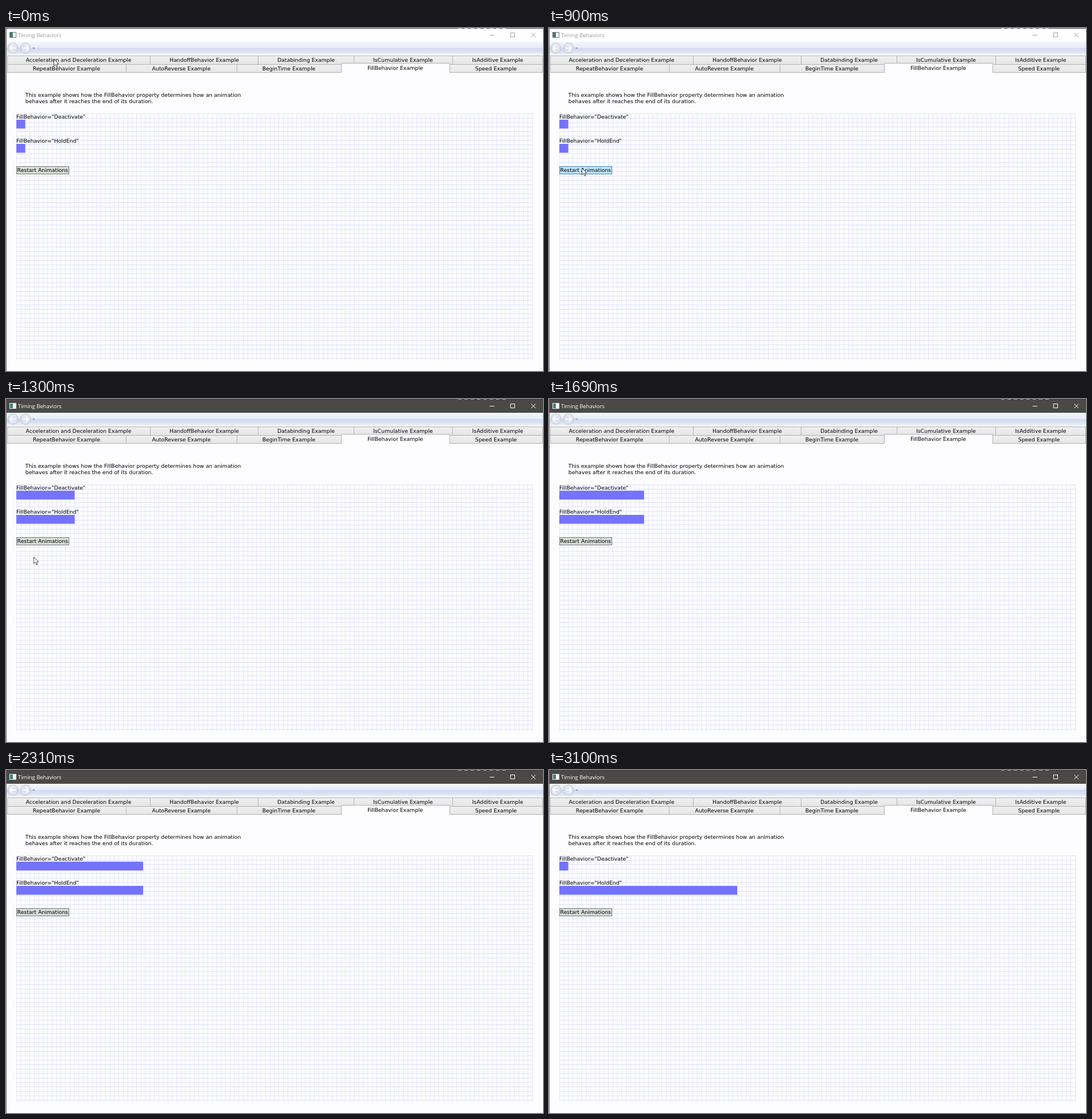
Recreate the animation shown at these times as an HTML page with a canvas. Size 936 px wide and 598 px high, loop 4.68 s.

```html
<!DOCTYPE html>
<html lang="en">
<head>
<meta charset="utf-8">
<title>Timing Behaviors</title>
<style>
  html, body { margin: 0; width: 100%; height: 100%; overflow: hidden; background: #fdfdff; }
  canvas { display: block; }
</style>
</head>
<body>
<canvas id="stage" width="936" height="598"></canvas>
<script>
const ctx = document.getElementById('stage').getContext('2d');
const W = 936, H = 598, LOOP = 4680;
const UNIT = 0.775;          // screen pixels per layout unit
const LEFT = 18;
const UI_FONT = '9.3px "DejaVu Sans", Verdana, sans-serif';
const TITLE_FONT = '9.45px "Open Sans", "Noto Sans", sans-serif';

// Pointer stops: [time, x, y]; no position means hidden
const POINTER = [
  [0, 83, 54], [110, 135, 218], [310, 107, 226], [500, 79, 235],
  [700, 57, 244], [1300, 48, 275], [1470]
];
const TICKS = [1100, 1300, 1470, 1690, 1910, 2110, 2310, 2510, 2700, 2900];
const ACTIVE_AT = 1100, END_AT = 3100;

const ROW_1 = [
  [2, 251, 126.5, 'Acceleration and Deceleration Example'],
  [251, 439, 345.5, 'HandoffBehavior Example'],
  [439, 606, 523, 'Databinding Example'],
  [606, 778, 692, 'IsCumulative Example'],
  [778, 935, 857, 'IsAdditive Example']
];
const ROW_2 = [
  [2, 209, 105.5, 'RepeatBehavior Example'],
  [209, 402, 305.5, 'AutoReverse Example'],
  [402, 584, 493, 'BeginTime Example'],
  [773, 935, 854, 'Speed Example']
];

function rect(x, y, w, h, color) {
  ctx.fillStyle = color;
  ctx.fillRect(x, y, w, h);
}

function frame(x, y, w, h, color) {
  ctx.strokeStyle = color;
  ctx.lineWidth = 1;
  ctx.strokeRect(x + 0.5, y + 0.5, w - 1, h - 1);
}

function line(points, color, width = 1) {
  ctx.strokeStyle = color;
  ctx.lineWidth = width;
  ctx.beginPath();
  points.forEach(([x, y]) => ctx.lineTo(x, y));
  ctx.stroke();
}

function text(str, x, y, align = 'left', color = '#000', font = UI_FONT) {
  ctx.font = font;
  ctx.textAlign = align;
  ctx.fillStyle = color;
  ctx.fillText(str, x, y);
}

function gradient(y0, y1, stops) {
  const g = ctx.createLinearGradient(0, y0, 0, y1);
  stops.forEach(([at, color]) => g.addColorStop(at, color));
  return g;
}

function titleBar(active) {
  const ink = active ? '#fff' : '#a3a3a3';
  rect(0, 0, W, 24, active ? '#4b4946' : '#fff');
  rect(0, 0, W, 1, '#3a3a3a');
  for (let x = 788; x < 866; x += 11) rect(x, 0, 6, 1, '#a8a8a8');

  rect(6, 7, 12, 10, active ? '#e8eeee' : '#6f7777');
  rect(7, 8, 10, 8, '#fff');
  rect(7, 8, 5, 8, '#3d7f78');
  text('Timing Behaviors', 21, 15.6, 'left', active ? '#fff' : '#999', TITLE_FONT);

  line([[843, 12.5], [851, 12.5]], ink);
  frame(879, 8, 8, 8, ink);
  line([[915.5, 8.5], [923, 16]], ink);
  line([[923, 8.5], [915.5, 16]], ink);
}

function navButton(x, dir) {
  const y = 35;
  ctx.beginPath();
  ctx.arc(x, y, 9, 0, Math.PI * 2);
  ctx.fillStyle = gradient(26, 44, [[0, '#eceff6'], [0.5, '#d9deea'], [1, '#e6eaf4']]);
  ctx.fill();
  ctx.strokeStyle = '#b9bfce';
  ctx.lineWidth = 1;
  ctx.stroke();
  line([[x - 5 * dir, y], [x + 5 * dir, y]], '#fff', 2);
  line([[x + dir, y - 4.5], [x + 5 * dir, y], [x + dir, y + 4.5]], '#fff', 2);
}

function navBar() {
  rect(0, 24, W, 23, gradient(24, 47, [
    [0, '#f4f7fe'], [0.45, '#e6ecf9'], [0.5, '#d3dbf0'], [0.75, '#d9e1f4'], [1, '#f3f6fd']
  ]));
  navButton(12, -1);
  navButton(34, 1);
  rect(46.5, 34.5, 3.5, 1, '#555');
}

function tab([x0, x1, mid, label], y, h, baseline) {
  rect(x0, y, x1 - x0 + 1, h, gradient(y, y + h, [[0, '#f0f0f0'], [1, '#e5e5e5']]));
  frame(x0, y, x1 - x0 + 1, h, '#b2b2b2');
  text(label, mid, baseline, 'center');
}

function tabs() {
  ROW_1.forEach(t => tab(t, 48, 16, 59.4));
  ROW_2.forEach(t => tab(t, 63, 15, 73.9));
  rect(584, 61, 190, 17, '#fdfdff');
  line([[584.5, 78], [584.5, 61.5], [773.5, 61.5], [773.5, 78]], '#b2b2b2');
  text('FillBehavior Example', 678.5, 72.9, 'center');
}

function grid() {
  const step = 10 * UNIT;
  for (let x = LEFT; x <= 918.5; x += step) rect(x, 149, UNIT, 430, '#e0e0fc');
  for (let y = 149; y <= 578; y += step) rect(LEFT, y, 901, 1, '#dedefb');
}

function bar(y, units) {
  rect(LEFT, y, units * UNIT, 15.5, '#7473ff');
}

function button(hover) {
  rect(18, 241, 92, 14, hover ? '#bee6fd' : '#dadeda');
  frame(18, 241, 92, 14, hover ? '#3c7fb1' : '#747474');
  text('Restart Animations', 19.6, 251.4);
}

function pointer(x, y) {
  const shape = [[0, 0], [0, 11.5], [2.7, 9], [4.7, 13.5], [6.6, 12.6], [4.7, 8.4], [8.3, 8.2]];
  ctx.beginPath();
  shape.forEach(([dx, dy]) => ctx.lineTo(x + 0.5 + dx, y + 0.5 + dy));
  ctx.closePath();
  ctx.fillStyle = '#fff';
  ctx.fill();
  ctx.strokeStyle = '#222';
  ctx.lineWidth = 0.8;
  ctx.stroke();
}

// Linear growth, sampled at the refresh times
function barUnits(t) {
  const tick = TICKS.filter(s => s <= t).pop();
  return tick === undefined ? 20 : (78 + (tick - 1100) * 0.1182) / UNIT;
}

function draw(t) {
  const active = t >= ACTIVE_AT, ended = t >= END_AT;
  const [, px, py] = POINTER.filter(p => p[0] <= t).pop();
  const units = barUnits(t);

  rect(0, 0, W, H, '#fdfdff');
  titleBar(active);
  navBar();
  tabs();
  rect(0, 0, 1, H, '#6b6b6b');

  text('This example shows how the FillBehavior property determines how an animation', 33.8, 119.6);
  text('behaves after it reaches the end of its duration.', 33.8, 130.8);

  grid();
  text('FillBehavior="Deactivate"', LEFT, 157.6);
  bar(159.8, ended ? 20 : units);
  text('FillBehavior="HoldEnd"', LEFT, 199.9);
  bar(202, ended ? 400 : units);
  button(t >= 700 && t < 1300);
  if (px !== undefined) pointer(px, py);
}

const start = performance.now();
function tick() {
  draw((performance.now() - start) % LOOP);
  requestAnimationFrame(tick);
}
tick();
</script>
</body>
</html>
```
